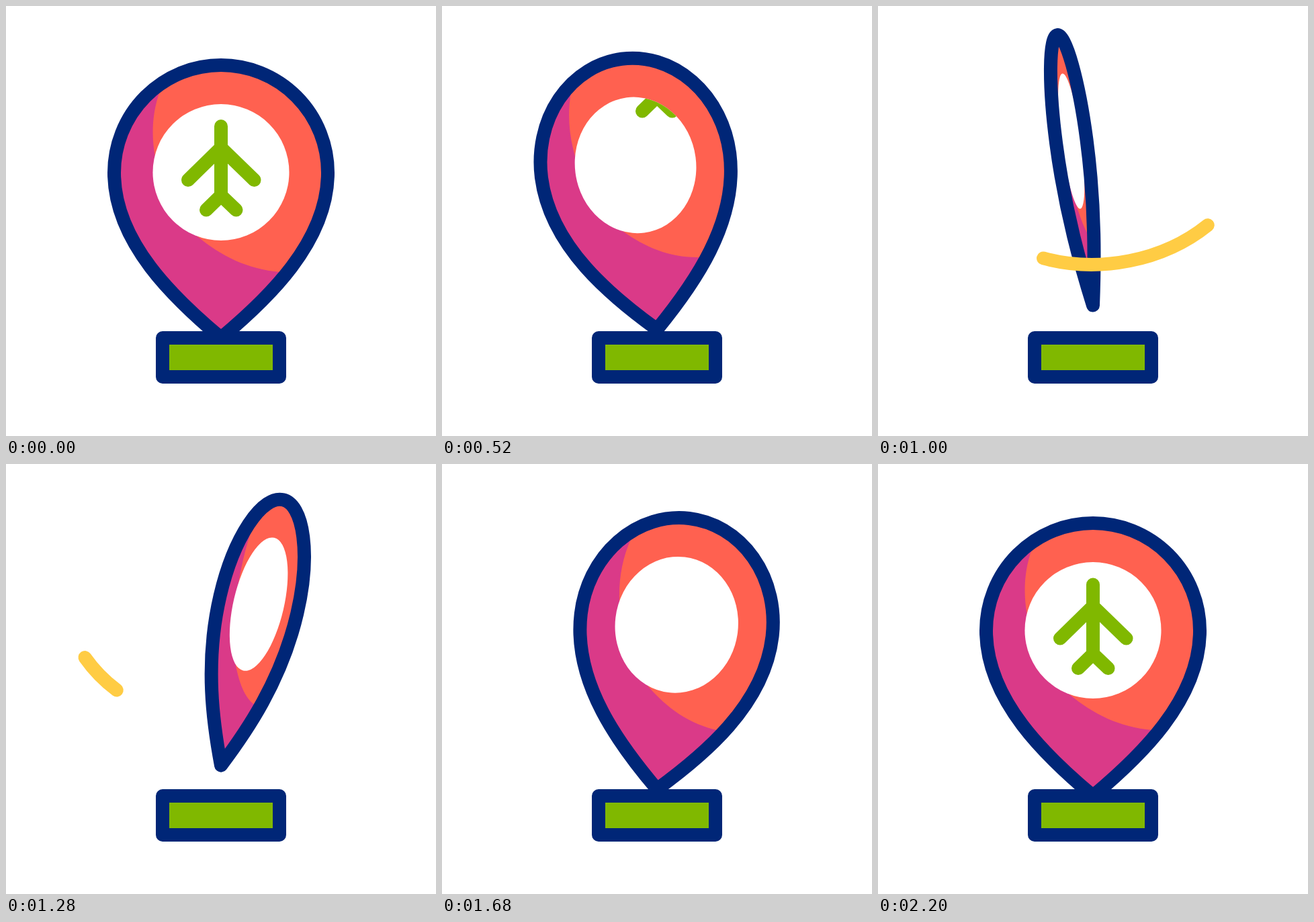
An HTML page without scripts for the animation above (2.24 s loop, 640 by 640 pixels).

```html
<!DOCTYPE html>
<html lang="en">
<head>
<meta charset="utf-8">
<title>Airport pin</title>
<style>
  @property --lift { syntax: '<length>'; inherits: true; initial-value: 0px; }
  @property --fly  { syntax: '<length>'; inherits: true; initial-value: 0px; }
  @property --head { syntax: '<length>'; inherits: true; initial-value: 0px; }
  @property --tail { syntax: '<length>'; inherits: true; initial-value: 0px; }
  @property --tilt { syntax: '<angle>'; inherits: true; initial-value: 0deg; }
  @property --spin { syntax: '<angle>'; inherits: true; initial-value: 0deg; }

  html, body { margin: 0; width: 100%; height: 100%; overflow: hidden; background: #fff; }
  svg {
    display: block; width: 100vw; height: 100vh;
    animation: 2240ms cubic-bezier(.333, 0, .667, 1) infinite;
    animation-name: lift, tilt, spin, fly, head, tail;
  }

  @keyframes lift {
    0%, 12.5%, 84.4%, 100% { --lift: 0px; }
    44.6%, 52.2% { --lift: -48.5px; }
  }
  @keyframes tilt {
    0%, 12.5%, 85%, 100% { --tilt: 0deg; }
    32.1%, 39.3% { --tilt: -13deg; }
    57.6%, 65.5% { --tilt: 13.2deg; }
  }
  @keyframes spin {
    0%, 85%, 100% { --spin: 0deg; }
    12.5% { --spin: 0deg; animation-timing-function: cubic-bezier(.33, .45, .67, .65); }
    32.1% { --spin: 47deg; animation-timing-function: linear; }
    47.5%, 49% { --spin: 89.5deg; animation-timing-function: linear; }
    65.4% { --spin: 47deg; animation-timing-function: cubic-bezier(.33, .35, .67, .55); }
  }
  @keyframes fly {
    0%, 99.1%, 100% { --fly: 0px; }
    32% { --fly: -180px; }
    32.01%, 74.1% { --fly: 181px; }
  }
  @keyframes head { 0%, 30.3% { --head: 0px; } 54.1%, 100% { --head: 100px; } }
  @keyframes tail { 0%, 40.6% { --tail: 0px; } 62.5%, 100% { --tail: 100px; } }
  @keyframes show { 0%, 62.5%, 100% { visibility: hidden; } 30.8% { visibility: visible; } }

  /* everything pivots on the tip of the pin */
  .pin {
    transform: translate(320px, calc(494px + var(--lift))) rotate(var(--tilt))
      scale(cos(var(--spin)), 1) translate(-320px, -494px);
  }
  .plane { transform: translateY(var(--fly)); }
  .swoosh {
    stroke-dasharray: calc(var(--head) - var(--tail)) 200px;
    stroke-dashoffset: calc(-1 * var(--tail));
    animation: show 2240ms step-end infinite;
  }
  .line { fill: none; stroke-width: 20; stroke-linecap: round; stroke-linejoin: round; }
  .navy { stroke: #002677; }
  #drop { vector-effect: non-scaling-stroke; }
</style>
</head>
<body>
<svg viewBox="0 0 640 640">
  <defs>
    <path id="drop" d="M320 494 C252 437 161 352 161 248 A159 160 0 0 1 479 248 C479 352 388 437 320 494 Z"/>
    <clipPath id="inDrop"><use href="#drop"/></clipPath>
    <clipPath id="inHole"><circle class="pin" cx="320" cy="247.5" r="101.5"/></clipPath>
  </defs>

  <g class="pin">
    <use href="#drop" fill="#ff6150"/>
    <path clip-path="url(#inDrop)" fill="#da3a88"
      d="M234 108 L229 127 C197 215 245 310 285 343 C320 372 360 392 408 396 L430 397 V510 H140 V108 Z"/>
    <circle cx="320" cy="247.5" r="101.5" fill="#fff"/>
    <use class="line navy" href="#drop"/>
  </g>

  <g clip-path="url(#inHole)">
    <path class="line plane" stroke="#80b800"
      d="M320 179 V282 M271 259 L320 211 L369.5 259 M298 303.5 L320 282 L342.5 303.5"/>
  </g>

  <rect class="line navy" x="233" y="494" width="174" height="58" style="fill: #80b800"/>

  <path class="line swoosh" stroke="#ffcc44" pathLength="100" d="M521 297 C421 413 209 418 117.5 288"/>
</svg>
</body>
</html>
```
